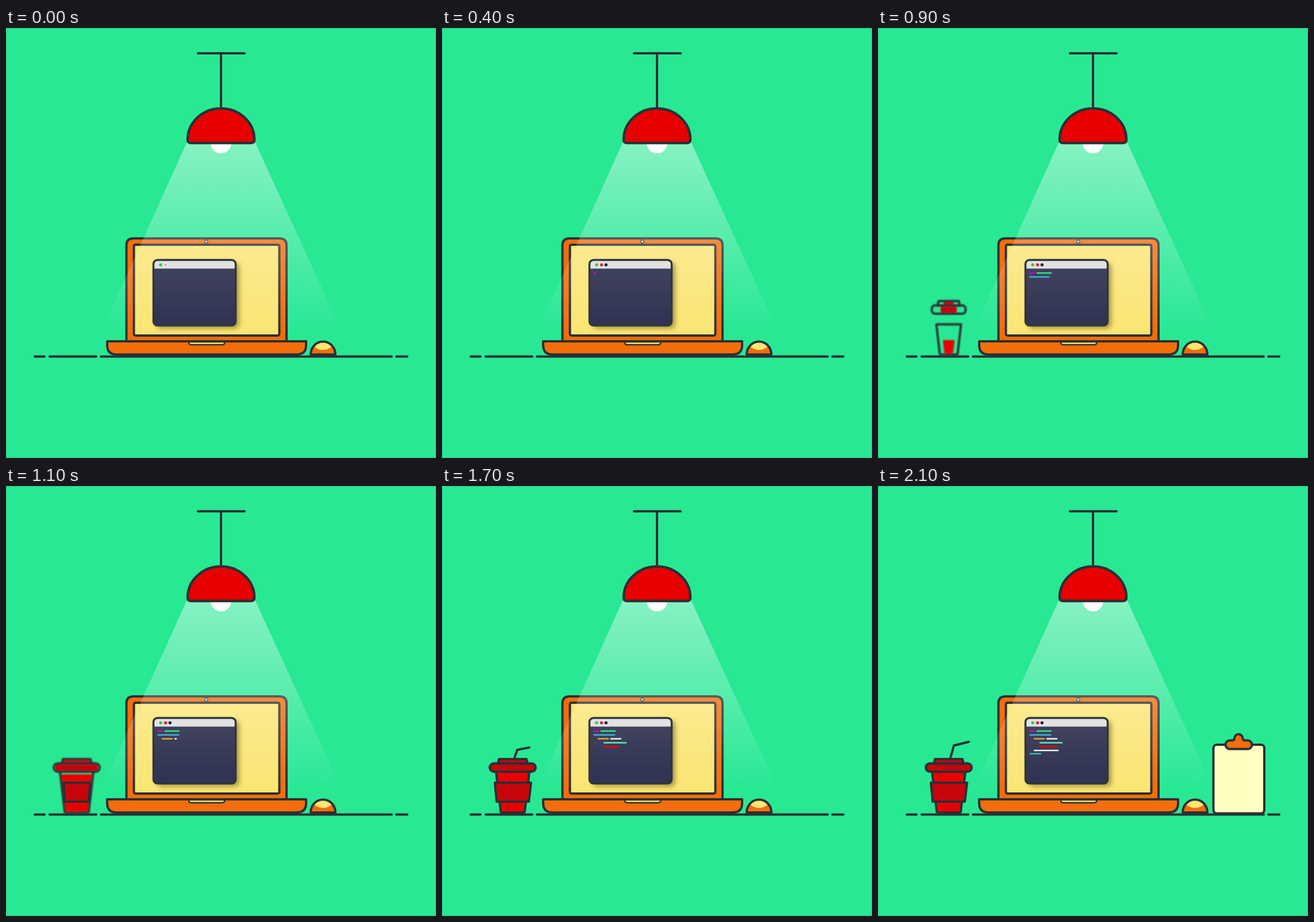
These frames come from a looping animation (748 px wide and 748 px high, 2200 ms). An HTML page:

```html
<!DOCTYPE html>
<html lang="en">
<head>
<meta charset="utf-8">
<title>Desk</title>
<style>
html, body { margin: 0; width: 100%; height: 100%; overflow: hidden; background: #28e894; }
svg { display: block; width: 100vw; height: 100vh; }
.ink { stroke: #2a3035; stroke-width: 4; stroke-linecap: round; stroke-linejoin: round; }
.ink * { vector-effect: non-scaling-stroke; }
</style>
</head>
<body>
<svg viewBox="0 0 748 748">
  <defs>
    <linearGradient id="beam" gradientUnits="userSpaceOnUse" x1="0" y1="198" x2="0" y2="530">
      <stop stop-color="#fff" stop-opacity=".44"/>
      <stop offset="1" stop-color="#fff" stop-opacity="0"/>
    </linearGradient>
    <linearGradient id="editor" x2="0" y2="1">
      <stop stop-color="#43455f"/>
      <stop offset="1" stop-color="#2f3152"/>
    </linearGradient>
    <filter id="shadow" x="-20%" y="-20%" width="150%" height="150%">
      <feDropShadow dx="6" dy="5" stdDeviation="4" flood-color="#6b5a10" flood-opacity=".6"/>
    </filter>
    <filter id="smear" filterUnits="userSpaceOnUse" x="60" y="440" width="130" height="150">
      <feGaussianBlur stdDeviation="1 1.2"/>
    </filter>
    <filter id="soft" filterUnits="userSpaceOnUse" x="100" y="430" width="80" height="60">
      <feGaussianBlur stdDeviation=".7"/>
    </filter>
  </defs>

  <rect width="748" height="748" fill="#28e894"/>
  <rect x=".5" y=".5" width="747" height="747" fill="none" stroke="#25ca83"/>

  <!-- laptop -->
  <g class="ink" fill="#f36d0a">
    <path d="M209.5 545V378q0-12 12-12H476q12 0 12 12V545z"/>
    <rect x="222.5" y="377" width="253" height="158" rx="3" fill="#fbe573"/>
    <circle cx="348.5" cy="371.5" r="2.6" fill="#fff" stroke-width="1.5"/>
    <path d="M176 545H522v7q0 16-17 16H193q-17 0-17-16z"/>
    <path d="M318 546H380.500q0 5-4 5H322q-4 0-4-5z" fill="#fbe573" stroke-width="2.500"/>
  </g>

  <!-- lamp -->
  <path d="M315 198H433L585 530H165z" fill="url(#beam)"/>
  <circle cx="374" cy="200" r="18" fill="#fff"/>
  <g class="ink" fill="#e80000">
    <path d="M334 44H415M374 44V139" fill="none"/>
    <path d="M316 194A58 54 0 0 1 432 194q0 6-6 6H322q-6 0-6-6z" stroke-width="4.500"/>
  </g>

  <!-- editor window -->
  <g>
    <rect x="256.500" y="403.500" width="143" height="114" rx="7" fill="url(#editor)" filter="url(#shadow)"/>
    <path d="M256.500 418.500V410q0-6.500 7-6.500H392.500q7 0 7 6.500V418.500z" fill="#e3e2e3"/>
    <rect x="256.500" y="403.500" width="143" height="114" rx="7" fill="none" stroke="#30363d" stroke-width="3.500"/>
    <circle cx="269" cy="412" r="2.700" fill="#2bd03c"/>
    <circle id="dot2" cx="277.500" cy="412" fill="#dc2448"/>
    <circle id="dot3" cx="285.300" cy="412" fill="#26282c"/>
    <g id="code" stroke-width="2.600" stroke-linecap="round"></g>
  </g>

  <!-- mouse -->
  <path d="M530 568A21.500 22.500 0 0 1 573 568z" fill="#f36d0a"/>
  <path d="M535.500 554Q551 566 567.500 554A21.500 22.500 0 0 0 535.500 554z" fill="#fbe573"/>
  <path class="ink" d="M530 568A21.500 22.500 0 0 1 573 568z" fill="none"/>

  <!-- cup -->
  <path id="straw" class="ink" fill="none"/>
  <g id="cup">
    <g id="bodyFill"><path d="M94 497H152L144 568H102z" fill="#e80000"/></g>
    <g id="bodyLine" class="ink"><path d="M94 497H152L144 566q0 2-3 2H105q-3 0-3-2z" fill="none"/></g>
    <g id="lidFill" fill="#c6040c">
      <path d="M99 475H147L149 483H97z"/>
      <rect x="83" y="482.500" width="80" height="14.500" rx="7.250"/>
    </g>
    <g id="lidLine" class="ink" fill="none">
      <path d="M99 475H147L149 483H97z"/>
      <rect x="83" y="482.500" width="80" height="14.500" rx="7.250"/>
    </g>
  </g>
  <g id="sleeve" class="ink" fill="#c6040c"><path d="M92 516H155L151 549H95z"/></g>

  <!-- clipboard -->
  <g id="board" class="ink" fill="#ffffc2"><rect x="583.500" y="450" width="88.500" height="119.500" rx="6"/></g>
  <g id="clip" class="ink" fill="#f36d0a">
    <path d="M612 442.500H617Q620 442 620 439A7.200 7.200 0 0 1 634.500 439Q634.500 442 638 442.500H643A7.500 7.500 0 0 1 643 457.500H612A7.500 7.500 0 0 1 612 442.500z"/>
  </g>

  <path class="ink" d="M50 571.500H67M76 571.500H157M165 571.500H671M679 571.500H698" fill="none"/>
</svg>
<script>
const LOOP = 2200, STEP = 100;
const el = id => document.getElementById(id);
const ramp = (t, start, span) => Math.min(1, Math.max(0, (t - start) / span));
const ease = (t, start, span) => {
  const p = ramp(t, start, span);
  return p * p * (3 - 2 * p);
};

// colour, y, left, right, typing start, typing end
const lines = [
  ['#c40cbc', 426.3, 264.5, 272, 350, 500],
  ['#2fe88c', 426.3, 277, 301, 520, 720],
  ['#38b9cd', 433, 264.5, 300, 700, 915],
  ['#dfa23a', 439.7, 272, 289, 950, 1080],
  ['#f2f2f2', 439.7, 294, 311, 1080, 1250],
  ['#58e0a4', 446.6, 282, 320, 1300, 1500],
  ['#e30613', 453.6, 282, 310, 1500, 1720],
  ['#f2f2f2', 460, 272, 313, 1720, 1950],
  ['#38b9b8', 465.7, 264.5, 283, 1950, 2100]
].map(([color, y, left, right, start, end]) => {
  const node = document.createElementNS('http://www.w3.org/2000/svg', 'path');
  node.setAttribute('stroke', color);
  el('code').append(node);
  return { node, y, left, right, start, end };
});

function scale(id, x, y, sx, sy) {
  const node = el(id);
  node.style.display = sx > 0 ? '' : 'none';
  node.setAttribute('transform', `translate(${x} ${y}) scale(${sx} ${sy}) translate(${-x} ${-y})`);
}

function draw(t) {
  el('dot2').setAttribute('r', 0.9 + 1.8 * ramp(t, 0, 200));
  el('dot3').setAttribute('r', t < 200 ? 0 : 1 + 1.7 * ramp(t, 200, 200));

  for (const { node, y, left, right, start, end } of lines) {
    const p = ramp(t, start, end - start);
    node.setAttribute('d', p ? `M${left} ${y}H${left + (right - left) * p}` : '');
  }

  // Cup outlines open first, their fills follow
  const outline = ease(t, 600, 450), fill = ease(t, 720, 450), wrap = ease(t, 900, 300);
  scale('bodyLine', 123, 568, outline, outline);
  scale('bodyFill', 123, 568, fill, fill);
  scale('lidLine', 123, 490, outline, 1);
  scale('lidFill', 123, 490, fill, 1);
  scale('sleeve', 123, 532, wrap, 1);
  el('cup').setAttribute('filter', t > 600 && t < 1200 ? 'url(#smear)' : 'none');

  const s = ease(t, 1400, 500), sx = Math.sqrt(s);
  const at = (x, y) => `${126 + x * sx} ${473 - y * s}`;
  const straw = el('straw');
  straw.setAttribute('d', s ? `M${at(0, 0)}L${at(6, 21.5)}L${at(32, 28)}` : '');
  straw.setAttribute('filter', s < 1 ? 'url(#soft)' : 'none');

  const page = ease(t, 1750, 300), grip = ease(t, 1800, 250);
  scale('board', 627.5, 569.5, page, page);
  scale('clip', 627.5, 450, grip, grip);
}

const origin = performance.now();
function tick() {
  const t = (performance.now() - origin) % LOOP;
  draw(Math.floor(t / STEP) * STEP);
  requestAnimationFrame(tick);
}
tick();
</script>
</body>
</html>
```
